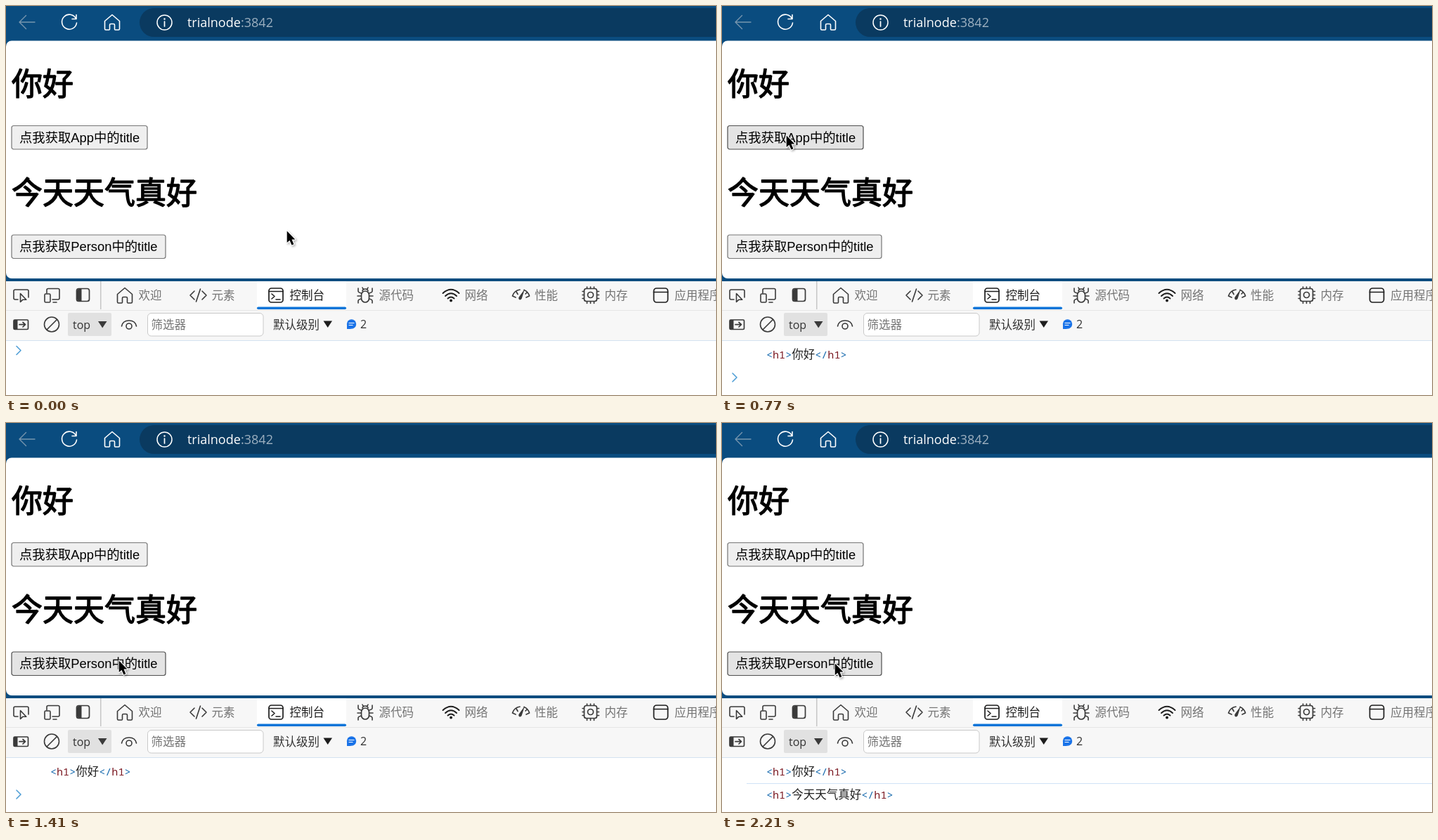
Recreate the animation shown at these times as an HTML page with a canvas. Size 1010 px wide and 554 px high, loop 2.23 s.

```html
<!DOCTYPE html>
<html lang="zh-CN">
<head>
<meta charset="utf-8">
<style>
  html, body { margin: 0; width: 100%; height: 100%; overflow: hidden; background: #fff; }
  canvas { display: block; width: 1010px; height: 554px; }
</style>
</head>
<body>
<canvas id="stage" width="1010" height="554"></canvas>
<script>
const ctx = document.getElementById('stage').getContext('2d');
const LOOP = 2230;
const CJK = '"Noto Sans CJK SC", "Noto Sans CJK", sans-serif';
const UI = '"Open Sans", ' + CJK;
const BUTTON = '"Liberation Sans", ' + CJK;
const MONO = '"Noto Sans Mono", "Liberation Mono", ' + CJK;
const LIGHT = 350;
const INK = '#3a3a3a', MUTED = '#747474', DARK = '#1d1d1d', BLUE = '#0a4c7f';

// Cursor tip over time: [ms, x, y]
const MOVES = [
  [0, 399, 320], [20, 396, 319], [60, 370, 308], [110, 288, 272], [160, 203, 235],
  [230, 133, 203], [260, 115, 195], [300, 95, 186], [320, 91, 184],
  [1109, 91, 184], [1110, 100, 190], [1150, 113, 213], [1200, 134, 254],
  [1250, 153, 299], [1290, 160, 321], [1340, 161, 332], [1410, 160, 338],
  [1570, 160, 338], [1670, 159, 342], [2080, 159, 342], [2100, 160, 342]
];
const TICKS = [0, 20, 40, 60, 90, 110, 130, 160, 180, 200, 230, 260, 280, 300, 320,
  1110, 1130, 1150, 1180, 1200, 1220, 1250, 1270, 1290, 1310, 1340, 1360, 1380, 1410,
  1590, 1620, 1640, 1670, 2100];
const CLICKS = [
  { down: 590, active: 620, up: 700 },
  { down: 1820, active: 1850, up: 1930 }
];

function fill(d, color) {
  ctx.fillStyle = color;
  ctx.fill(new Path2D(d));
}
function stroke(d, color = INK, width = 1.6) {
  ctx.strokeStyle = color;
  ctx.lineWidth = width;
  ctx.stroke(new Path2D(d));
}
function rect(x, y, w, h, color) {
  ctx.fillStyle = color;
  ctx.fillRect(x, y, w, h);
}
function box(x, y, w, h, r, color, border, width = 1) {
  ctx.beginPath();
  ctx.roundRect(x, y, w, h, r);
  if (color) { ctx.fillStyle = color; ctx.fill(); }
  if (border) { ctx.strokeStyle = border; ctx.lineWidth = width; ctx.stroke(); }
}
function circle(x, y, r, color, border, width = 1.6) {
  ctx.beginPath();
  ctx.arc(x, y, r, 0, Math.PI * 2);
  if (color) { ctx.fillStyle = color; ctx.fill(); }
  if (border) { ctx.strokeStyle = border; ctx.lineWidth = width; ctx.stroke(); }
}
function text(s, x, y, size, color, family = UI, weight = 400) {
  ctx.font = `${weight} ${size}px ${family}`;
  ctx.fillStyle = color;
  ctx.fillText(s, x, y);
}
// Semi-bold look: regular glyphs thickened by a thin outline
function heading(s, y) {
  text(s, 8, y, 44, '#000', CJK);
  ctx.strokeStyle = '#000';
  ctx.lineWidth = 1.4;
  ctx.strokeText(s, 8, y);
}
function home(x, y, color) {
  stroke(`M${x} ${y + 9}L${x + 10.5} ${y}L${x + 21} ${y + 9}V${y + 20}q0 1.5 -1.5 1.5h-4.5q-1 0 -1 -1
    v-6q0 -1.5 -1.5 -1.5h-4q-1.5 0 -1.5 1.5v6q0 1 -1 1h-4.5q-1.5 0 -1.5 -1.5z`, color, 1.6);
}

function drawBrowserBar() {
  rect(0, 0, 1010, 392, BLUE);
  box(190, 3, 860, 41, 20.5, '#0a3a60');
  stroke('M41 23H19M28.500 13.500L19 23L28.500 32.500', '#7796ae', 1.4);
  stroke('M99.500 18A10.500 10.500 0 1 0 100.500 24M100 12.500V18.500H94', '#fff', 1.6);
  home(140.500, 12.500, '#fff');
  circle(225.500, 23.500, 10.500, null, '#fff', 1.5);
  stroke('M225.500 22V29', '#fff', 1.7);
  circle(225.500, 18.500, 1.200, '#fff');
  text('trialnode', 258, 30, 18, '#fff');
  text(':3842', 334, 30, 18, '#9db0c0');
}

function drawPage(hovered, pressed) {
  box(0, 49.500, 1020, 338.500, [8, 0, 0, 8], '#fff');
  heading('你好', 127);
  heading('今天天气真好', 282);
  [['点我获取App中的title', 170, 193], ['点我获取Person中的title', 325.500, 219]].forEach(([label, y, w], i) => {
    const over = hovered === i;
    const face = pressed === i ? '#f5f5f5' : over ? '#e4e4e4' : '#efefef';
    box(8, y + .5, w, 33.500, 3, face, over ? '#4f4f4f' : '#767676', 1.2);
    text(label, 19, Math.floor(y) + 24, 18.333, '#000', BUTTON, LIGHT);
  });
}

function drawTabs() {
  rect(0, 392, 1010, 162, '#f7f7f7');
  rect(0, 433, 1010, 1, '#e6e6e6');
  rect(134, 392, 1.5, 40, '#c6c6c6');
  rect(357, 392, 127, 40, '#fff');
  box(357, 428.500, 127, 3.500, 2, '#0a74d8');

  stroke('M17 418H13q-2 0 -2 -2V406q0 -2 2 -2H30q2 0 2 2V415');
  fill('M20 409V422L23.500 418.500H29z', '#f7f7f7');
  stroke('M20.500 409.500V421.500L24 418.200H28.800z');
  stroke('M58 409V404.500q0 -2 2 -2H74q2 0 2 2V416q0 2 -2 2H66M67 422H72');
  box(55, 410, 8, 12, 1.5, null, INK, 1.6);
  box(100.500, 402.500, 18, 18, 3, null, INK, 1.7);
  box(101, 403, 6.500, 17, [3, 0, 0, 3], INK);
  home(158.500, 401.500, INK);
  stroke('M268 406L262 412L268 418M279 406L285 412L279 418M276.500 403L270.500 421');
  box(374, 402, 20, 20, 3.500, null, DARK, 1.7);
  stroke('M374 406.500H394M378 410L382 413.500L378 417M384 418H390', DARK, 1.6);

  // Bug
  box(505.500, 406, 11, 16, 5.500, null, INK, 1.7);
  stroke(`M507 406q0 -3 4 -3t4 3M507 401L508.500 404M515 401L513.500 404M500 413H505M517 413H522
    M501 402V406q0 2 4.500 3M521 402V406q0 2 -4.500 3M501 423V420q0 -2 4.500 -3M521 423V420q0 -2 -4.500 -3`);
  // Signal
  stroke('M621.500 409Q633 398.500 644.500 409M625 413Q633 405.500 641 413M628.500 416.500Q633 412.500 637.500 416.500', DARK, 1.9);
  circle(633, 419.500, 2, DARK);
  // Gauge
  stroke('M720.500 413Q723 405 731 404M737 404.500Q743 407 744.500 413M720.500 413L725 415M744.500 413L740 415M726 407L728 410.500M739 410L741 408', INK, 1.7);
  fill('M738 403L733.500 417q-2 2.500 -4 .5q-1 -2 .5 -3.500z', INK);
  // Chip
  box(822.500, 402.500, 18, 18, 3, null, INK, 1.7);
  circle(831.500, 411.500, 4, null, INK, 1.7);
  for (const offset of [-5, 0, 5]) {
    const x = 831.5 + offset, y = 411.5 + offset;
    stroke(`M${x} 400V402M${x} 421V423.500M820 ${y}H822M841 ${y}H843.500`);
  }
  box(921.500, 402, 20, 20, 4, null, DARK, 1.7);
  stroke('M921.500 407.500H941.500', DARK, 1.7);

  [['欢迎', 188.5], ['元素', 292.5], ['控制台', 403.5], ['源代码', 530.5], ['网络', 652.5],
    ['性能', 752], ['内存', 851.5], ['应用程序', 951]].forEach(([label, x]) =>
    text(label, x, 418, 16.5, label === '控制台' ? DARK : MUTED, CJK, LIGHT));
}

function drawToolbar() {
  box(11, 447, 20.500, 13.500, 1.5, null, INK, 1.7);
  rect(11, 447, 5.500, 13.500, INK);
  stroke('M19 453.700H27M24 450.500L27.500 453.700L24 457', INK, 1.7);
  circle(65, 453.500, 10.500, null, INK);
  stroke('M58 461L72.500 446.500');
  box(88, 437, 62, 33, 2, '#e1e1e1');
  text('top', 95, 460, 16, '#333');
  fill('M131 449H143.500L137.200 458.500z', INK);
  stroke('M164.500 456Q166 448 175 448T185.500 456');
  circle(175, 456, 4, null, INK);
  box(201.500, 437.500, 164.500, 32.500, 5, '#fff', '#c9c9c9');
  text('筛选器', 206.500, 460, 16.5, '#757575', CJK, LIGHT);
  text('默认级别', 380, 460, 16.5, '#333', CJK, LIGHT);
  fill('M451.500 448.500H464L457.700 458z', DARK);
  circle(491.500, 453, 6.700, '#1a73e8');
  fill('M485 453V460H491z', '#1a73e8');
  stroke('M488 451.500H495M488 454.500H493', '#fff', 1.2);
  text('2', 504, 459, 16, '#333');
}

function drawLog(content, y) {
  const [sign, tag] = ['#1468ad', '#7c1b24'];
  let x = 63;
  const put = (s, color, size = 15.1, family = MONO, weight = 400) => {
    text(s, x, y, size, color, family, weight);
    x += ctx.measureText(s).width;
  };
  put('<', sign); put('h1', tag); put('>', sign);
  put(content, '#222', 16.5, CJK, LIGHT);
  put('</', sign); put('h1', tag); put('>', sign);
}

function drawConsole(logs) {
  rect(0, 476, 1010, 78, '#fff');
  rect(0, 476, 1010, 1, '#d4e2f0');
  if (logs > 0) drawLog('你好', 502);
  if (logs > 1) {
    rect(35, 513, 975, 1, '#d0e3f6');
    drawLog('今天天气真好', 535);
  }
  const y = [490.5, 529, 565][logs];
  stroke(`M15 ${y - 6}L21 ${y}L15 ${y + 6}`, '#509fd6', 1.6);
}

function drawCursor(x, y) {
  const arrow = 'M0 0V16.500L3.800 13.200L6.800 20L9.700 18.700L6.800 12H11.700z';
  ctx.save();
  ctx.translate(x + .7, y + .5);
  ctx.save();
  ctx.shadowColor = 'rgba(0,0,0,.3)';
  ctx.shadowBlur = 3;
  ctx.shadowOffsetX = ctx.shadowOffsetY = 1.5;
  stroke(arrow, '#fff', 2.4);
  ctx.restore();
  fill(arrow, '#000');
  ctx.restore();
}

function cursorAt(time) {
  const t = TICKS.filter(tick => tick <= time).pop();
  const next = MOVES.findIndex(move => move[0] > t);
  if (next < 0) return MOVES[MOVES.length - 1].slice(1);
  const a = MOVES[next - 1], b = MOVES[next];
  const k = (t - a[0]) / (b[0] - a[0]);
  return [1, 2].map(i => Math.round(a[i] + (b[i] - a[i]) * k));
}

function hoveredButton(x, y) {
  if (x >= 8 && x <= 201 && y >= 171 && y <= 202) return 0;
  if (x >= 8 && x <= 227 && y >= 327 && y <= 359) return 1;
  return -1;
}

function draw(t) {
  const [x, y] = cursorAt(t);
  const pressed = CLICKS.findIndex(c => t >= c.active && t < c.up);
  ctx.lineCap = ctx.lineJoin = 'round';
  drawBrowserBar();
  drawPage(hoveredButton(x, y), pressed);
  drawTabs();
  drawToolbar();
  drawConsole(CLICKS.filter(c => t >= c.up).length);
  drawCursor(x, y);
  if (CLICKS.some(c => t >= c.down && t < c.up)) circle(x + 1, y + 1, 15.5, 'rgba(247,229,20,.62)');
}

const start = performance.now();
function frame() {
  draw((performance.now() - start) % LOOP);
  requestAnimationFrame(frame);
}
frame();
</script>
</body>
</html>
```
